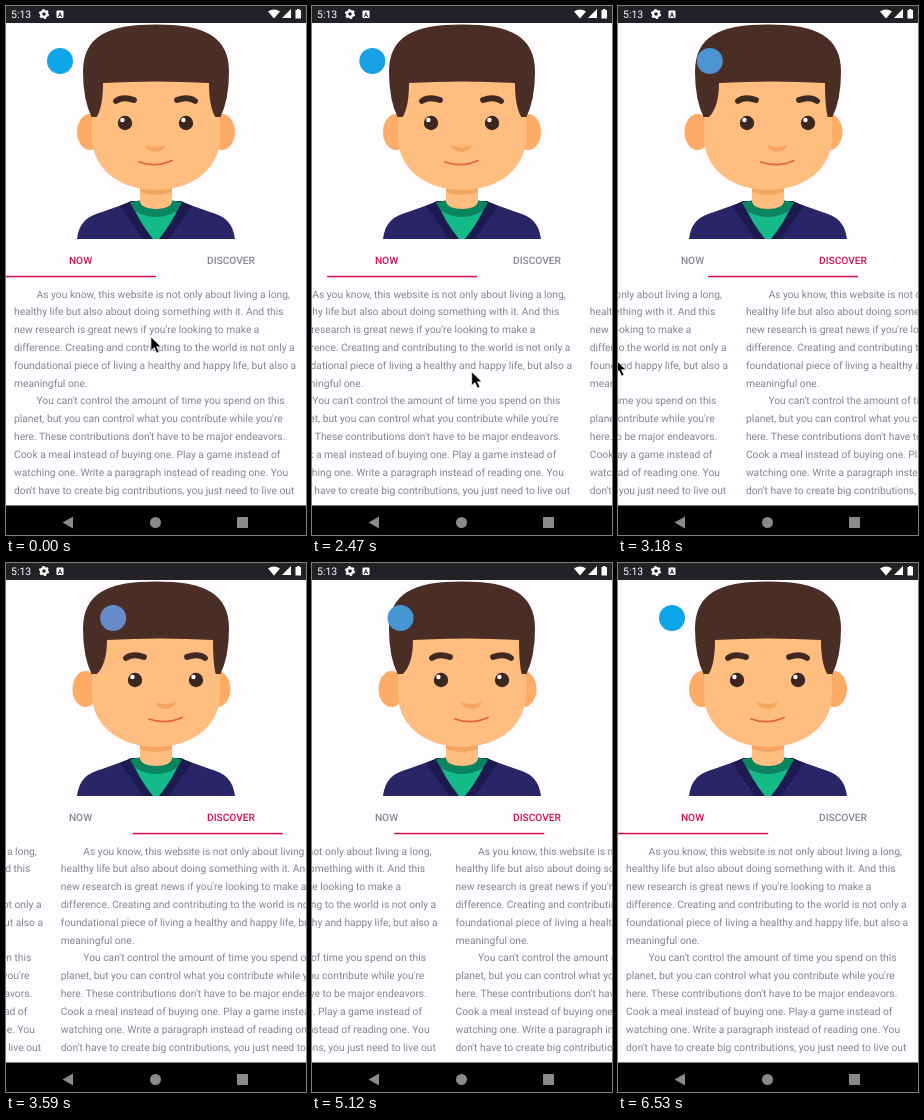
Recreate the animation shown at these times as an HTML page. Size 300 px wide and 529 px high, loop 6650 ms.

```html
<!DOCTYPE html>
<html lang="en">
<head>
<meta charset="utf-8">
<title>Pager with turning head</title>
<style>
  html, body { margin: 0; width: 100%; height: 100%; overflow: hidden; background: #fefcff; }
  svg { display: block; width: 100vw; height: 100vh; }
  text { font-family: Roboto, Arial, sans-serif; text-rendering: geometricPrecision; }
  .copy { font-size: 10.28px; fill: #878490; }
  .tab { font-size: 10.2px; font-weight: 500; text-anchor: middle; }
</style>
</head>
<body>
<svg viewBox="0 0 300 529">
  <defs>
    <g id="page" class="copy"></g>
    <g id="eye">
      <circle cy="117" r="7.2" fill="#3b2620"/>
      <circle cx="-2.6" cy="114" r="2.2" fill="#fff"/>
    </g>
  </defs>
  <rect width="300" height="529" fill="#fefcff"/>

  <!-- Body -->
  <path d="M71 233C73 217 81 210 96 206L127 195H173L204 206C219 210 227 217 229 233Z" fill="#2a2567"/>
  <path d="M125 195L114 200 137 233H163L186 200 175 195Z" fill="#1d1a52"/>
  <path d="M125 196Q133 216 147 233H153Q167 216 175 196Z" fill="#14ba88"/>
  <path d="M124 197Q134 193 150 193T176 197L171 205Q150 217 129 205Z" fill="#0b8560"/>
  <path d="M134 170H166V196Q164 203 150 203 136 203 134 196Z" fill="#ffbd80"/>
  <path d="M134 176H166V186Q150 192 134 186Z" fill="#f4a55f"/>

  <!-- Head -->
  <g id="ears" fill="#fdac67">
    <ellipse cx="84" cy="126" rx="13" ry="18"/>
    <ellipse cx="216" cy="126" rx="13" ry="18"/>
  </g>
  <path d="M86 112Q77 94 77 66C77 30 102 18.500 150 18.500S223 30 223 66Q223 94 214 112Z" fill="#4a2d25"/>
  <path d="M86 111H214V134C212 165 184 184 150 184S88 165 86 134Z" fill="#ffbd80"/>
  <path id="brow" fill="#ffbd80"/>
  <g id="face">
    <g fill="none" stroke="#3f2921" stroke-width="5.800" stroke-linecap="round">
      <path d="M110 95Q117 90 128 94"/>
      <path d="M171 94Q182 90 189 95"/>
    </g>
    <use href="#eye" x="119"/>
    <use href="#eye" x="180"/>
    <path d="M139 139Q149 143 160 139 157 146 149.500 146 142 146 139 139Z" fill="#f6a65f"/>
    <path d="M133 156Q150 162 166 154.500" fill="none" stroke="#e2623d" stroke-width="1.800" stroke-linecap="round"/>
  </g>
  <circle id="badge" cy="55" r="13"/>

  <!-- Tabs and pages -->
  <text id="now" class="tab" x="74.500" y="257.700">NOW</text>
  <text id="discover" class="tab" x="225" y="257.700">DISCOVER</text>
  <rect id="line" y="269.800" width="150" height="1.500" fill="#d2104f"/>
  <g id="pager">
    <use href="#page"/>
    <use href="#page" x="300"/>
  </g>

  <!-- System bars -->
  <rect width="300" height="17" fill="#222126"/>
  <g fill="#fff">
    <text x="5" y="12" font-size="10.500">5:13</text>
    <circle cx="38" cy="8" r="2.900" fill="none" stroke="#fff" stroke-width="2.200"/>
    <circle cx="38" cy="8" r="4.300" fill="none" stroke="#fff" stroke-width="1.600" stroke-dasharray="2.250"/>
    <rect x="50.500" y="4.500" width="7" height="7.500" rx="1"/>
    <text x="54" y="10.600" font-size="6.500" font-weight="700" text-anchor="middle" style="fill:#222126">A</text>
    <path d="M262 5.500Q268 1.500 274 5.500L268 12.500Z"/>
    <path d="M285 3V12H276Z"/>
    <path d="M289.500 4H291V3H293.500V4H295V12.500H289.500Z"/>
  </g>
  <rect y="499.500" width="300" height="30" fill="#000"/>
  <g fill="#8a898d">
    <path d="M56.500 516.500L67 510.500V522.500Z"/>
    <circle cx="149.500" cy="516.500" r="5.500"/>
    <rect x="231" y="511" width="11" height="11"/>
  </g>
  <path id="cursor" d="M0 0V13.500L3.200 10.600 5.700 16 8 15 5.600 9.700H10Z" fill="#000" stroke="#fff" stroke-width=".6"/>
</svg>
<script>
const $ = id => document.getElementById(id);
const LOOP = 6650;
const RED = "#d2104f", GRAY = "#8a8793";
const copy = [
  "As you know, this website is not only about living a long,",
  "healthy life but also about doing something with it. And this",
  "new research is great news if you're looking to make a",
  "difference. Creating and contributing to the world is not only a",
  "foundational piece of living a healthy and happy life, but also a",
  "meaningful one.",
  "You can't control the amount of time you spend on this",
  "planet, but you can control what you contribute while you're",
  "here. These contributions don't have to be major endeavors.",
  "Cook a meal instead of buying one. Play a game instead of",
  "watching one. Write a paragraph instead of reading one. You",
  "don't have to create big contributions, you just need to live out"
];
copy.forEach((line, i) => {
  const text = document.createElementNS("http://www.w3.org/2000/svg", "text");
  text.setAttribute("x", i % 6 ? 8 : 30.5);
  text.setAttribute("y", 291.5 + i * 17.82);
  text.textContent = line;
  $("page").append(text);
});

// Keys: time, value(s)
const scroll = [[0, 0], [2120, 0], [2470, .1], [3180, .6], [3420, .69], [3620, .87],
  [3800, .97], [3950, 1], [4560, 1], [5120, .55], [5320, .2], [5480, .05], [5640, 0], [LOOP, 0]];
const pointer = [[0, 145, 331], [120, 145, 331], [760, 165, 342], [1470, 196.5, 366], [2050, 196.5, 366],
  [2470, 160, 366], [3180, -2, 354], [3300, -14, 352], [4000, -14, 352], [4470, 72, 349],
  [4540, 74, 349], [5060, 205, 349], [LOOP, 205, 349]];

function sample(keys, t) {
  const i = keys.findIndex(k => k[0] > t);
  const a = keys[i - 1], b = keys[i];
  const u = (t - a[0]) / (b[0] - a[0]);
  return a.slice(1).map((v, n) => v + (b[n + 1] - v) * u);
}

const move = (id, x, y = 0) => $(id).setAttribute("transform", `translate(${x} ${y})`);
const mix = (a, b, u) => `rgb(${a.map((v, i) => Math.round(v + (b[i] - v) * u))})`;

function draw(now) {
  const t = now % LOOP;
  const [p] = sample(scroll, t);
  const u = Math.min(1, Math.max(0, (p - .35) / .18));
  const turn = u * u * (3 - 2 * u);
  const shift = 4 * turn;

  move("pager", -300 * p);
  move("line", 150 * p);
  move("face", 10 * turn);
  move("ears", -4.5 * turn);
  $("brow").setAttribute("d", `M90 112Q${97 + shift} 102 ${97 + shift} 77Q${150 + shift} 74 ${203 + shift} 77Q${203 + shift} 102 210 112Z`);
  $("badge").setAttribute("cx", 54 + 63 * p);
  $("badge").setAttribute("fill", mix([14, 165, 233], [118, 137, 195], p));
  $("now").setAttribute("fill", p < .5 ? RED : GRAY);
  $("discover").setAttribute("fill", p < .5 ? GRAY : RED);
  move("cursor", ...sample(pointer, t));
  $("cursor").style.display = t < 5060 ? "" : "none";
}

const start = performance.now();
function tick() {
  draw(performance.now() - start);
  requestAnimationFrame(tick);
}
tick();
</script>
</body>
</html>
```
